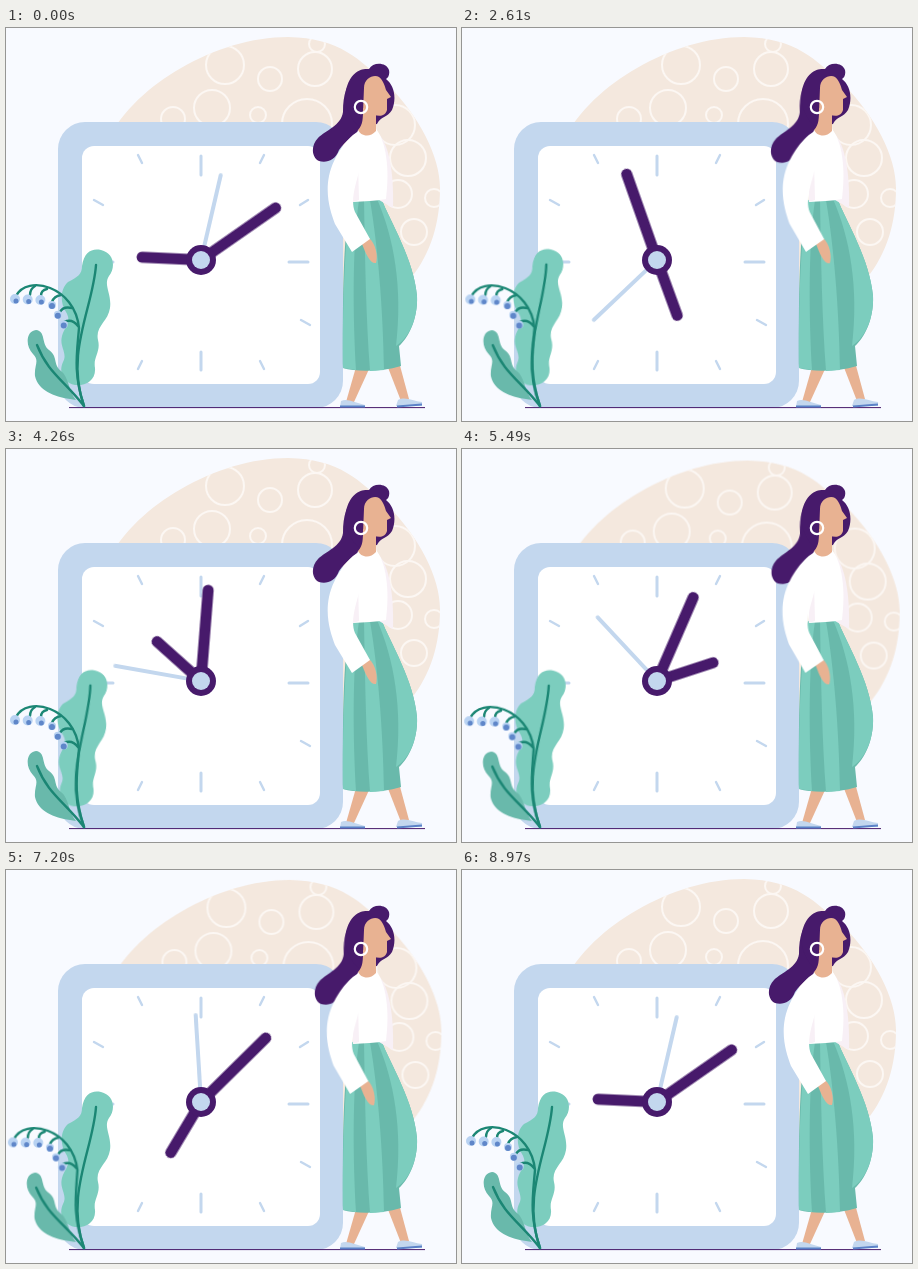
Recreate the animation shown at these times as an HTML page. Size 450x393 px, loop 9000 ms.

```html
<!DOCTYPE html>
<html lang="en">
<head>
<meta charset="utf-8">
<title>Clock</title>
<style>
html, body { margin: 0; width: 100%; height: 100%; overflow: hidden; background: #f8faff; }
svg { display: block; width: 100vw; height: 100vh; }
.sky { fill: #c3d7ee; }
.tick { stroke: #c3d7ee; stroke-linecap: round; }
.hair { fill: #471a6b; }
.skin { fill: #e8b292; }
.mint { fill: #7ccdbe; }
.fold { fill: #69b9ab; }
.blush { fill: #f8f0f6; }
.stem { stroke: #1b8674; stroke-width: 2.4; fill: none; stroke-linecap: round; }
.bells { fill: none; stroke: #b8d2f2; stroke-linecap: round; }
.rings { fill: none; stroke: #fcf7f3; stroke-width: 2; }

/* Hands: one eased sweep per loop, starting from a jump. */
.hand {
  stroke: #471a6b; stroke-width: 11; stroke-linecap: round;
  animation: sweep 9s cubic-bezier(.333, 0, .667, 1) infinite;
}
#hour { --from: 41deg; --to: 632.7deg; }
#minute { --from: 321.8deg; --to: 415.1deg; }
#second { --from: 153.5deg; --to: 373.1deg; stroke: #c3d7ee; stroke-width: 4; animation-timing-function: cubic-bezier(.333, .3, .667, 1); }
@keyframes sweep {
  0%, .3% { transform: rotate(var(--to)); }
  .31% { transform: rotate(var(--from)); }
  100% { transform: rotate(var(--to)); }
}

/* Sways: out and back around a pivot. */
.sway { animation: lean 4.5s ease-in-out infinite; }
#locks { --tilt: -2.8deg; transform-origin: 350px 60px; }
#arm { --tilt: 1.5deg; transform-origin: 352px 108px; }
#leaf, #flower, #sprig { transform-origin: 78px 378px; }
#leaf { --tilt: -2.3deg; animation: settle 9s ease-in-out infinite; }
#flower { --tilt: -1.5deg; animation: nod 9s ease-in-out infinite; }
#sprig { --tilt: -1deg; animation: nod 9s ease-in-out infinite; }
#blob { animation: drift 9s ease-in-out infinite; }
@keyframes lean { 30% { transform: rotate(var(--tilt)); } }
@keyframes settle { 14%, 45% { transform: rotate(var(--tilt)); } 80% { transform: none; } }
@keyframes nod {
  0%, 25%, 48%, 100% { transform: rotate(0deg); }
  14%, 37%, 70% { transform: rotate(var(--tilt)); }
}
@keyframes drift {
  0%, 51%, 93%, 100% { transform: translate(0, 0); }
  62% { transform: translate(3.8px, 2.6px); }
}
</style>
</head>
<body>
<svg viewBox="0 0 450 393">
  <defs>
    <path id="blobShape" d="M103 110C130 57 210 9 282 9C335 10 353 32 381 56C413 88 434 128 434 160C434 195 425 225 405 250L300 280L103 200Z"/>
    <clipPath id="blobClip"><use href="#blobShape"/></clipPath>
  </defs>

  <g id="blob">
    <use href="#blobShape" fill="#f4e8de"/>
    <g class="rings" clip-path="url(#blobClip)">
      <circle cx="219" cy="37" r="19"/>
      <circle cx="206" cy="80" r="18"/>
      <circle cx="264" cy="51" r="12"/>
      <circle cx="309" cy="41" r="17"/>
      <circle cx="301" cy="96" r="25"/>
      <circle cx="311" cy="16" r="8"/>
      <circle cx="167" cy="91" r="12"/>
      <circle cx="252" cy="87" r="8"/>
      <circle cx="402" cy="130" r="18"/>
      <circle cx="389" cy="97" r="20"/>
      <circle cx="392" cy="166" r="14"/>
      <circle cx="408" cy="204" r="13"/>
      <circle cx="428" cy="170" r="9"/>
    </g>
  </g>

  <rect class="sky" x="52" y="94" width="285" height="286" rx="27"/>
  <rect x="76" y="118" width="238" height="238" rx="12" fill="#fff"/>
  <path class="tick" stroke-width="3" d="M195 128V147M195 324V342M283 234H302M88 234H107"/>
  <path class="tick" stroke-width="2.4" d="M258 127L254 135M132 127L136 135M302 172L294 177M88 172L97 177M295 292L304 297M254 333L258 341M136 333L132 341"/>
  <path d="M63 379.6H419" stroke="#471a6b" stroke-width="1"/>

  <g transform="translate(195 232)">
    <path id="second" class="hand" d="M0 0V-87"/>
    <path id="hour" class="hand" d="M0 0V-59"/>
    <path id="minute" class="hand" d="M0 0V-91"/>
    <circle r="15" class="hair"/>
    <circle r="9" class="sky"/>
  </g>

  <g id="leaf">
    <path class="mint" d="M69 357C58 355 52 345 57 334C62 325 53 319 56 308C59 298 66 294 60 284C54 275 54 261 62 254C72 249 76 246 76 238C78 224 86 220 95 222C108 225 110 239 103 248C97 257 106 266 104 280C102 294 89 298 92 312C95 324 87 329 89 340C90 352 80 358 69 357Z"/>
    <path class="stem" d="M90 237C87 280 59 325 78 378"/>
  </g>
  <g id="sprig">
    <path class="fold" d="M64 371C48 369 32 362 29 348C28 337 34 333 27 326C19 318 20 303 30 302C40 303 35 316 43 322C52 328 47 337 55 343C63 349 62 362 70 372Z"/>
    <path class="stem" d="M31 317C42 345 58 352 78 378"/>
  </g>
  <g id="flower">
    <path class="stem" d="M78 378C67 345 71 325 73 300C69 258 21 246 10 268"/>
    <path class="stem" stroke-width="2" d="M29 258Q24 261 24 267M41 261Q35 262 35 268M55 267Q48 268 46 274M66 280Q57 278 54 284M72 298Q66 290 58 294"/>
    <path class="bells" stroke-width="10" stroke-dasharray="0 12.7" d="M9 271L35 272"/>
    <path class="bells" stroke-width="8" stroke-dasharray="0 11.4" d="M46 277L58 297"/>
    <g stroke="#5f86c9">
      <path class="bells" style="stroke: inherit" stroke-width="5" stroke-dasharray="0 12.7" d="M10 273L36 274"/>
      <path class="bells" style="stroke: inherit" stroke-width="6" stroke-dasharray="0 11.4" d="M46 278L58 298"/>
    </g>
  </g>

  <g id="woman">
    <path class="skin" d="M350 339H364L348 374H340Z"/>
    <path class="skin" d="M381 337L393 334L403 371L395 373Z"/>
    <path class="sky" d="M335 373C341 370 350 375 359 377V379H334Z"/>
    <path class="sky" d="M392 372C399 368 407 373 416 374V378H390Z"/>
    <path d="M334 378.5H359M391 378.5L416 376.5" stroke="#5b82c8" stroke-width="2"/>

    <path class="fold" d="M346 172L375 170C385 195 408 232 411 268C412 292 402 310 393 318L395 338C375 344 350 344 337 340C337 290 336 200 346 172Z"/>
    <path class="mint" d="M346 172C339 200 336 280 337 340L350 342C347 290 346 220 353 172Z"/>
    <path class="mint" d="M358 172C359 230 360 290 364 343L378 342C377 280 372 220 364 172Z"/>
    <path class="mint" d="M371 171C388 210 397 260 390 318C406 308 412 285 411 268C408 232 385 195 375 170Z"/>

    <g id="locks">
      <path class="hair" d="M347 52C358 46 366 60 364 86L354 102C348 108 340 112 333 122C329 133 320 135 313 133C305 129 305 117 312 110C320 102 335 98 337 84C337 66 341 56 347 52Z"/>
    </g>
    <path class="hair" d="M340 62C344 45 354 40 363 41C367 34 380 34 383 42C384 47 382 50 380 51C388 57 391 70 386 82C382 89 374 89 371 96L354 99C342 90 338 75 340 62Z"/>
    <path class="blush" d="M370 103C382 113 388 140 387 180L373 172Z"/>
    <path d="M352 102C346 120 344 150 347 174C358 173 370 173 380 171C384 140 380 113 370 101Z" fill="#fff"/>
    <path class="blush" d="M347 140L352 136L353 172L347 174Z"/>
    <path class="skin" d="M357 80L370 84L370 103C363 111 354 107 352 102C357 97 357 90 357 80Z"/>
    <path class="skin" d="M358 60C358 50 368 46 373 49C377 52 379 58 380 62L385 69L381 71L381 82C379 89 373 88 368 87L357 84Z"/>
    <circle cx="355" cy="79" r="6.2" fill="none" stroke="#fff" stroke-width="2.2"/>
    <g id="arm" class="sway">
      <path class="skin" d="M356 216L363 210C370 216 372 228 370 235C364 236 360 226 356 216Z"/>
      <path d="M353 103C343 108 328 126 323 148C319 168 325 185 329 196L346 224L364 211L349 184C344 172 350 156 354 140Z" fill="#fff"/>
    </g>
  </g>
</svg>
<script>
document.getElementById('locks').classList.add('sway');
</script>
</body>
</html>
```
